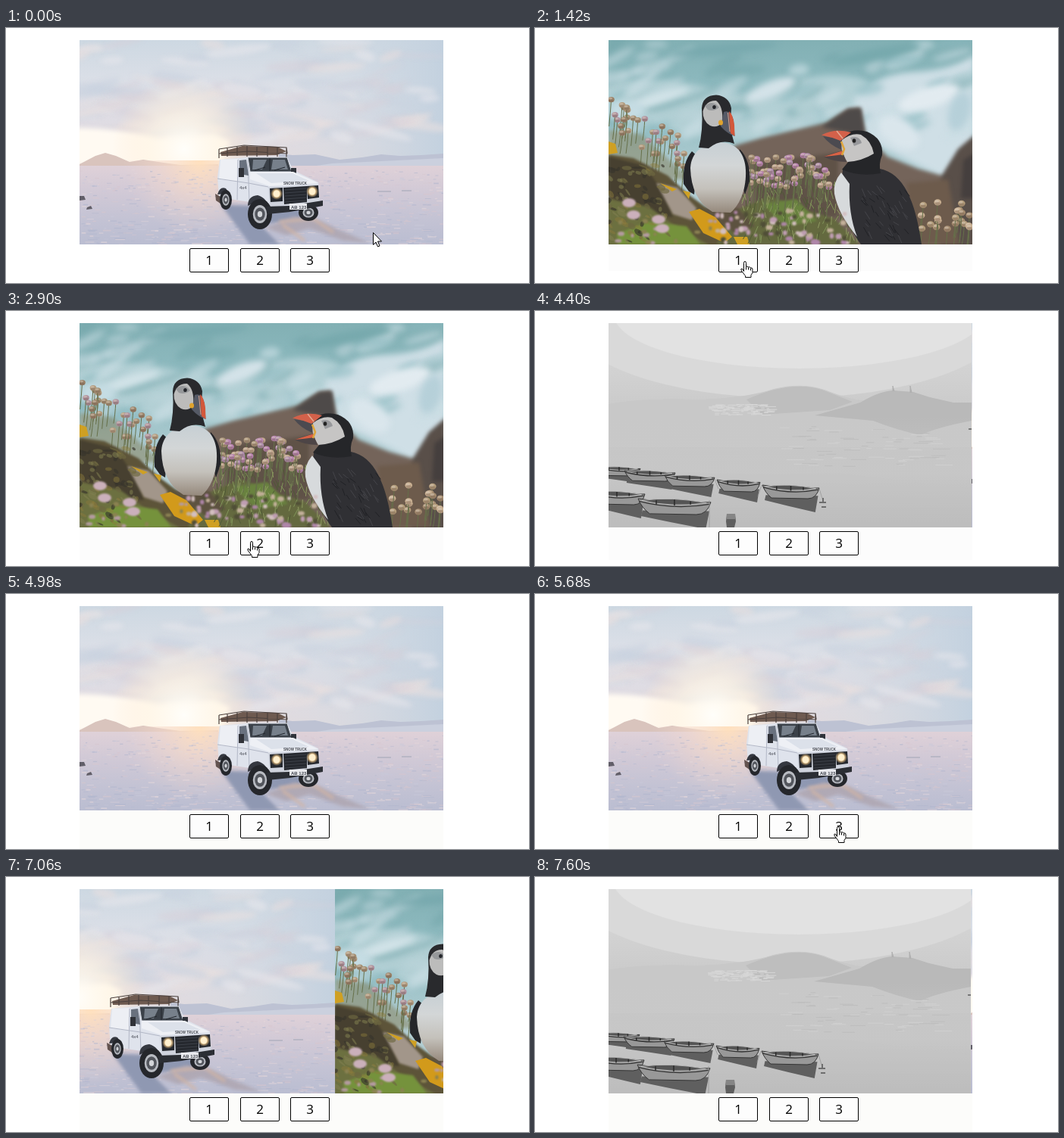
Write an HTML page with a canvas that moves like this. It is 690 by 337 pixels and loops after 8000 ms.

```html
<!DOCTYPE html>
<html lang="en">
<head>
<meta charset="utf-8">
<title>Image carousel</title>
<style>
  html, body { margin: 0; width: 100%; height: 100%; overflow: hidden; background: #fff; }
  canvas { display: block; width: 690px; height: 337px; }
</style>
</head>
<body>
<canvas id="stage" width="690" height="337"></canvas>
<script>
const LOOP = 8000, LEFT = 97, TOP = 16, W = 480, H = 270;
const SPEED = 1.15 / W; // slides per ms
const BUTTONS = [242, 309, 375];
const stage = document.getElementById('stage').getContext('2d');
let g; // context of the scene being painted

// ---------- drawing helpers ----------
function shape(d, fill, stroke, width = 1) {
  const path = new Path2D(d);
  if (fill) { g.fillStyle = fill; g.fill(path); }
  if (stroke) { g.strokeStyle = stroke; g.lineWidth = width; g.stroke(path); }
}
function oval(x, y, rx, ry, fill, angle = 0) {
  g.fillStyle = fill;
  g.beginPath();
  g.ellipse(x, y, rx, ry, angle, 0, 7);
  g.fill();
}
function rect(x, y, w, h, fill) {
  g.fillStyle = fill;
  g.fillRect(x, y, w, h);
}
function stops(gradient, ...colors) {
  colors.forEach((c, i) => gradient.addColorStop(i / (colors.length - 1), c));
  return gradient;
}
const vertical = (y0, y1, ...colors) => stops(g.createLinearGradient(0, y0, 0, y1), ...colors);
const glow = (x, y, r, ...colors) => stops(g.createRadialGradient(x, y, 0, x, y, r), ...colors);
function blurred(radius, paint) {
  g.filter = `blur(${radius}px)`;
  paint();
  g.filter = 'none';
}
function random(seed) {
  return (a = 0, b = 1) => a + (b - a) * ((seed = seed * 16807 % 2147483647) / 2147483647);
}
function makeScene(paint) {
  const canvas = document.createElement('canvas');
  canvas.width = W;
  canvas.height = H;
  g = canvas.getContext('2d');
  g.translate(-LEFT, -TOP);
  paint();
  return canvas;
}

// ---------- puffins ----------
function flowers(r, count, x0, x1, yAt, colors, size) {
  for (let i = 0; i < count; i++) {
    const x = r(x0, x1), y = yAt(x) + r(-20, 24), color = colors[i % colors.length];
    shape(`M${x},${y} q-1,18 -3,${r(25, 42)}`, null, '#66704a', 1);
    oval(x, y, size, size * .85, color);
    oval(x, y + size * .35, size * .75, size * .45, '#6b554855');
    oval(x - 1, y - 1.5, size * .6, size * .35, '#ddd0c077');
  }
}
function puffins() {
  const r = random(41);
  rect(LEFT, TOP, W, H, vertical(16, 200, '#82b0b4', '#93bec4', '#b2cdd2'));
  blurred(4, () => {
    shape('M85,75 Q160,60 230,80 T340,70 Q400,55 440,70 L430,110 300,150 190,140 85,100Z', '#b3d0d5');
    shape('M420,95 Q450,60 500,58 T580,35 V150 L540,198 440,150Z', '#cfdfe6');
    for (let i = 0; i < 70; i++) {
      oval(r(90, 580), r(18, 140), r(12, 34), r(4, 9), ['#bdd6dbaa', '#cbdfe5aa', '#6fa3a877', '#8ebbc199'][i % 4], r(-.7, 0));
    }
    oval(165, 92, 40, 7, '#d2e3e8', -.3);
    oval(120, 110, 24, 14, '#c5dce3');
    oval(310, 82, 36, 11, '#d3e2e8', -.4);
    oval(520, 92, 42, 14, '#e2ebf0', -.3);
    oval(480, 138, 30, 18, '#dae6ec', .6);
    oval(560, 110, 14, 26, '#b6d0d9', .3);
    oval(450, 35, 60, 8, '#77a9ad', -.2);
    oval(250, 28, 70, 7, '#78a9ae', -.1);
  });
  blurred(2.5, () => {
    shape('M262,156 L300,145 385,125 412,107 429,105 436,140 465,170 505,186 540,196 580,205 V290 H250Z', '#74645a');
    shape('M378,131 L414,107 430,106 435,142 Z', '#4e4a49');
    shape('M536,196 L558,160 580,141 V290 H535Z', '#594f49');
    shape('M565,175 L580,165 V225 H562Z', '#453f3e');
    shape('M290,178 L400,165 400,250 290,250Z', '#5f5247');
    shape('M490,205 L545,200 560,286 500,286Z', '#6d5b4c');
    shape('M97,135 L140,140 205,200 97,200Z', '#85825f88');
  });
  flowers(r, 34, 97, 198, x => 108 + (x - 97) * .58, ['#a48f72', '#9a8268', '#b0929f', '#b39d80'], 4.3);

  blurred(1.5, () => {
    shape('M97,167 L130,172 175,195 205,222 260,262 300,290 H97Z', '#5d5439');
    shape('M97,170 L145,182 172,222 182,250 130,245 97,220Z', '#474030');
    shape('M97,226 L150,236 180,258 235,290 H97Z', '#6c7040');
    shape('M160,205 L188,211 213,238 207,254 182,246Z', '#a2968a');
    shape('M255,245 L310,222 350,238 395,252 428,286 H240Z', '#64693f');
    shape('M300,232 L345,226 372,255 330,262Z', '#69823f');
    shape('M222,238 L268,238 290,262 262,270Z', '#5d5240');
    shape('M108,272 L150,256 200,262 218,286 H110Z', '#75923c');
  });
  for (let i = 0; i < 90; i++) {
    oval(r(97, 175), r(180, 282), r(2, 7), r(1, 4), ['#6d6840aa', '#37352caa', '#81805088', '#8c7a3c77'][i % 4], r(0, 1));
  }
  shape('M203,243 L217,239 238,250 260,276 250,284 222,271Z', '#d29a1b');
  shape('M97,150 L106,153 109,165 97,167Z M165,205 l22,8 -6,3Z M195,215 l10,2 -2,9Z M262,276 l18,0 3,10 h-16Z', '#cfa023');
  for (let i = 0; i < 170; i++) {
    const x = r(270, 425), y = r(215, 286);
    shape(`M${x},${y} l${r(-6, 6)},${r(-13, -7)}`, null, ['#82965a', '#4f5b35', '#8f9b62'][i % 3]);
  }
  flowers(r, 75, 283, 388, x => 186 + Math.abs(x - 335) * .1, ['#b08fae', '#ac977a', '#bfa58c', '#b984b2'], 4.3);
  flowers(r, 20, 500, 574, x => 250, ['#b39c7a', '#c9b092', '#a68d70'], 4.8);

  // left bird
  shape('M207,163 Q194,178 196,206 L203,216 210,220 215,170Z M270,160 Q285,175 283,203 L277,220 266,180Z', '#25262a');
  shape('M205,185 C206,164 222,152 243,151 C266,151 277,166 278,188 C279,210 272,232 258,244 L234,243 Q206,226 205,185Z',
    vertical(150, 244, '#c6cfd4', '#d3d6d7', '#c4c1bb', '#95897c'));
  shape('M220,106 Q221,89 239,88.5 Q256,90 259,106 Q256,132 263,153 Q245,146 229,159 L216,158 Q222,136 220,106Z', '#292a2d');
  shape('M221.5,110 Q226,95 239,96 Q249,104 247,125 Q240,133 231,129 Q221,123 221.5,110Z', '#bcbcbb');
  shape('M224,103 Q235,94 243,105 Q236,111 228,108Z', '#96989a');
  oval(236.5, 104.5, 2.3, 2.6, '#24262b');
  shape('M249,111 Q258,107 262,122 L263.5,143 Q254,140 245,130Z', '#555a66');
  shape('M256,110 Q261,114 263,128 L263.5,143 L258,139Z', '#d3583b');
  oval(245, 125, 3, 3.5, '#dfa32d');
  shape('M254.5,112 L257,137', null, '#d9a28c');

  // right bird
  shape('M406,187 Q420,175 455,186 C486,192 502,228 510,286 H430 Q411,261 403,221Z', '#303034');
  shape('M404,191 Q393,204 395,219 Q400,246 425,276 Q413,245 415,206Z', '#d7dadc');
  shape('M406,141 Q421,132 438,137 Q460,146 458,168 Q453,179 456,192 Q427,197 405,187 L414,176Z', '#252629');
  shape('M404,149 Q417,138 430,141 Q444,149 447,166 Q431,176 412,177 Q403,164 404,149Z', '#c6c5c4');
  shape('M416,145 Q428,141 431,152 L421,156Z', '#97989b');
  oval(421, 149, 2.3, 2.8, '#222');
  shape('M380,143 L405,147 404,161 Q388,154 380,143Z', '#4b4a50');
  shape('M378,141.5 Q395,132 417,138 L403,149 Q391,144 378,141.5Z', '#d3614a');
  shape('M381,170 Q394,165 405,162 L411,177 Q394,177 381,170Z', '#4d4546');
  shape('M381,170 L405,162.5 407,167 Q394,169 381,170Z', '#d96245');
  shape('M398,136 L406,146', null, '#e3aa92', 1.5);
  shape('M404,150 l4,10 -3,8', null, '#dfa63c', 2.5);
  for (let i = 0; i < 50; i++) shape(`M${r(430, 488)},${r(208, 275)} l${r(3, 8)},${r(4, 12)}`, null, i % 2 ? '#45454a' : '#202125');

  blurred(1, () => {
    for (let i = 0; i < 65; i++) {
      oval(r(240, 415), r(240, 284), r(2, 5), r(2, 4), ['#bf9db2', '#c3b09a', '#ae85a8', '#504e37', '#d3bfc0'][i % 5]);
    }
    for (let i = 0; i < 16; i++) oval(r(105, 240), r(245, 284), r(2, 5), r(2, 3), i % 2 ? '#b49aa0' : '#8b8252');
    [[124, 231], [130, 247], [163, 253], [168, 265]].forEach(([x, y]) => oval(x, y, 9, 6, '#cbb0bb'));
  });
}

// ---------- boats ----------
function boat(x, y, w, h, reflection = 14) {
  g.save();
  g.translate(x, y);
  shape(`M${w * .06},${h * .75} L${w * .98},${h * .8} L${w * .93},${h + reflection} Q${w * .5},${h + reflection * .6} ${w * .04},${h + 2}Z`, '#5f5f5f');
  shape(`M0,1 Q${w * .45},${h * .35} ${w},${h * .26} Q${w * .95},${h} ${w * .8},${h} L${w * .16},${h * .95} Q${w * .05},${h * .6} 0,1Z`, '#989898', '#353535', 1);
  shape(`M${w * .05},${h * .16} Q${w * .45},${h * -.1} ${w * .94},${h * .3} Q${w * .48},${h * .6} ${w * .05},${h * .16}Z`, '#555', '#c5c5c5', .8);
  shape(`M1,${h * .2} Q${w * .5},${h * .75} ${w * .98},${h * .38}`, null, '#333', 1.3);
  shape(`M${w * .25},${h * .15} v${h * .25} M${w * .5},${h * .1} v${h * .35} M${w * .72},${h * .2} v${h * .2}`, null, '#292929', 1.5);
  g.restore();
}
function boats() {
  const r = random(17);
  rect(LEFT, TOP, W, H, vertical(16, 286, '#dadada', '#d1d1d1', '#c7c7c7', '#c2c2c2', '#b7b7b7'));
  oval(335, 10, 290, 105, '#d9d9d9');
  oval(350, 4, 245, 72, '#e2e2e2');
  shape('M97,123 Q145,114 215,117 Q280,115 316,103 Q352,94 383,104 Q420,119 440,118 L577,126 V180 H97Z', '#c8c8c8');
  shape('M280,117 Q345,88 390,108 L420,120 390,131 300,137Z', '#bebebe');
  shape('M370,138 L430,121 Q455,106 473,105 L500,107 522,114 553,121 577,121 V145 Q530,154 510,164 Q480,158 447,145Z', '#b9b9b9');
  shape('M473,106 v-7 l2,7 M496,108 v-9 l2,9', '#b0b0b0', '#b0b0b0');
  rect(LEFT, 140, W, 146, vertical(140, 286, '#c9c9c900', '#c9c9c9aa', '#bababa99'));
  for (let i = 0; i < 90; i++) rect(r(230, 308), r(123, 137), r(3, 14), 1, '#d7d7d7');
  for (let i = 0; i < 75; i++) rect(r(320, 530), r(152, 205), r(5, 24), 1, i % 2 ? '#d0d0d0' : '#bdbdbd');
  shape('M97,205 Q220,219 400,214 L577,235 V286 H97Z', '#c4c4c455');
  rect(573, 155, 4, 2, '#777');
  boat(84, 205, 56, 13, 9);
  boat(119, 210, 67, 15, 11);
  boat(172, 216, 66, 16, 14);
  boat(241, 222, 57, 17, 14);
  boat(301, 229, 75, 19, 18);
  boat(72, 237, 74, 19, 18);
  boat(137, 247, 96, 22, 19);
  shape('M238,222 L243,235 M300,230 l-5,15 M231,250 V286 M376,235 l5,16', null, '#999', .8);
  shape('M254,268 h11 l1,10 -2,8 h-10 l-1,-8Z', '#5f5f5f');
  rect(254, 268, 11, 7, '#858585');
  shape('M376,252 h9 v2 h-9Z M380,247 h2 v5 h-2Z M379,258 h6 v2 h-6Z', '#6d6d6d');
}

// ---------- car on the snow ----------
function wheel(x, y, rx, ry) {
  oval(x, y, rx, ry, '#25272c');
  oval(x, y, rx * .58, ry * .6, '#b8bbc2');
  oval(x, y, rx * .42, ry * .44, '#53565d');
  oval(x, y, rx * .2, ry * .2, '#d3d5d9');
}
function car() {
  const r = random(77);
  rect(LEFT, TOP, W, 170, vertical(16, 180, '#cdd8e2', '#dbdfe7', '#dfdce3', '#e2dadd'));
  rect(LEFT, TOP, W, 170, stops(g.createLinearGradient(97, 0, 577, 0), '#d9dfe500', '#d9dfe500', '#c3d1df'));
  blurred(3, () => {
    for (let i = 0; i < 90; i++) {
      oval(r(90, 580), r(18, 145), r(12, 48), r(2, 8), ['#e8dfdf99', '#c9d3df88', '#e6e6ec99', '#d6d1d988'][i % 4], r(-.4, .3));
    }
    shape('M90,132 Q150,132 200,146 L275,141 295,150 285,180 90,182Z', '#fffaf2');
  });
  rect(LEFT, TOP, W, 170, glow(235, 160, 95, '#fffefa', '#fff5e4aa', '#ffe8d000'));
  shape('M97,180 L118,169 131,165 145,169 163,177 181,174 208,178 230,181 280,180 V188 H97Z', '#d9c4bd');
  shape('M360,166 L378,168 408,167 440,174 470,171 495,167 520,169 548,168 577,166 V195 H360Z', '#bdc2d3');
  shape('M390,185 L430,179 475,177 577,172 V196 H390Z', '#cbd0de');
  rect(LEFT, 182, W, 104, vertical(182, 286, '#dfd1d8', '#d1c9d6', '#c4c3d4', '#babdd1'));
  rect(LEFT, 175, W, 111, glow(255, 175, 100, '#ffe0bd', '#f6dacb88', '#f0d6cf00'));
  for (let i = 0; i < 850; i++) {
    const y = r(187, 286);
    rect(r(97, 577), y, r(2, (y - 170) / 9 + 3), r(.6, 1.8), ['#e5d7da99', '#aeb5cc88', '#d7c7cf99', '#c9c9d988'][i % 4]);
  }
  shape('M97,222 h6 l2,5 -8,1Z M107,237 l5,-2 2,4 -8,1Z', '#615e68');
  shape('M490,216 h18 M522,215 h13', null, '#a0a5b5');
  blurred(2, () => {
    shape('M283,233 L322,286 361,286 335,260 410,251 385,238Z', '#8f98b2');
    shape('M342,264 L380,249 415,255 440,267 480,284 445,281 400,265 370,274Z', '#b0a9b5');
    shape('M360,256 L405,252 432,270 M365,260 L394,281', null, '#d3b5a4', 3);
  });

  // roof rack
  shape('M283,164 L312,156 358,157 370,163 357,168 284,169Z', '#6e5a50');
  shape('M281,160 L314,155 370,158 371,166 M281,160 V172 M281,166 L320,163 371,166 M292,159 V170 M305,157 V169 M318,156 V170 M331,157 V170 M345,157 V170 M358,158 V170 M370,158 V171',
    null, '#4a403d', 1.2);
  // body
  shape('M282,174 L318,171 371,171 379,188 412,204 414,235 347,239 322,230 281,224 279,197Z', '#dfe3ec');
  shape('M283,174 L306,173 305,203 281,200Z', '#edeff4');
  shape('M279,199 L320,205 346,210 M306,174 L305,227 M319,174 L321,230', null, '#b2b7c6');
  shape('M308,175 L317,174 320,195 308,193Z', '#69717e');
  rect(307, 185, 7, 12, '#303238');
  shape('M319,171 L371,171 377,190 322,190Z', '#3b4149', '#d9dde5');
  shape('M326,174 L344,174 338,187 325,187Z M352,174 L368,174 372,187 350,187Z', '#77808b');
  shape('M348,172 V189 M328,188 l14,-4 M354,188 l14,-4', null, '#22262c');
  rect(376, 185, 7, 10, '#30343b');
  shape('M322,190 L379,190 412,205 348,209 322,200Z', '#eef0f5');
  shape('M330,192 L378,192 400,202 350,205Z', '#dce1ea');
  shape('M346,210 L412,207 414,230 348,238Z', '#cfd3dd');
  shape('M348,212 L365,211 365,229 349,230Z M397,209 L412,208 413,224 398,226Z M366,211 L397,209 397,230 367,233Z', '#25282e');
  for (let y = 214; y < 231; y += 4) shape(`M368,${y} L396,${y - 2}`, null, '#3d4149');
  [[357, 219], [404, 216]].forEach(([x, y]) => {
    oval(x, y, 8, 8, glow(x, y, 8, '#fff9e5', '#ffdda4', '#e7b66f00'));
    oval(x, y, 4.2, 4.5, '#fff0cf');
  });
  shape('M319,235 Q319,222 332,221 Q344,224 350,242 L344,246 Q338,229 330,230Z M279,220 Q282,209 290,212 L297,222 292,219Z', '#353840');
  shape('M276,219 L285,224 283,232 277,228Z', '#63534f');
  wheel(290, 227, 8, 13);
  wheel(399, 244, 13, 11);
  wheel(335, 246, 16, 20);
  shape('M343,236 L374,235 418,228 418,235 375,243 345,246Z', '#2b2e34');
  rect(374, 232, 23, 8, '#e9eaee');
  g.fillStyle = '#41454e';
  g.font = 'bold 6px "Liberation Sans", sans-serif';
  g.fillText('AB 123', 376, 238.5);
  g.font = 'bold 4.5px "Liberation Sans", sans-serif';
  g.fillText('SNOW TRUCK', 366, 206.5);
  g.font = '6px "Liberation Sans", sans-serif';
  g.fillText('4x4', 308, 213);
}

const scenes = [puffins, boats, car].map(makeScene);

// ---------- timeline ----------
// The picture refreshes only inside these spans: start, end, number of steps.
const REFRESHES = [[150, 570, 4], [850, 1880, 8], [2160, 3170, 9], [3290, 3710, 4],
  [4400, 5280, 7], [5530, 5800, 3], [6080, 6080, 1], [6790, 7600, 7]];
// start, slide to reach, jump at once
const MOVES = [[140, 3], [1460, 4], [2150, 3], [3280, 4], [4399, 5], [5800, 6, true], [6767, 4]];
// each visit of the pointer: time, x, y
const VISITS = [
  [[0, 484, 270], [150, 484, 270], [570, 300, 301], [850, 300, 301], [1140, 271, 308], [2160, 271, 308]],
  [[2660, 318, 313], [2780, 318, 304], [3710, 318, 304]],
  [[5000, 394, 337], [5280, 394, 312], [5530, 394, 307], [6080, 394, 307]]
];

function refreshTime(t) {
  let held = 0;
  for (const [start, end, count] of REFRESHES) {
    if (t < start) break;
    const step = (end - start) / (count - 1) || 1;
    held = Math.min(end, start + Math.floor((t - start) / step + 1e-6) * step);
  }
  return held;
}
function slidePosition(t) {
  let position = 2;
  for (const [start, target, jump] of MOVES) {
    if (t < start) break;
    const gap = target - position;
    position += jump ? gap : Math.sign(gap) * Math.min(Math.abs(gap), (t - start) * SPEED);
  }
  return position;
}
function pointerAt(t) {
  const visit = VISITS.find(v => t >= v[0][0] && t < v[v.length - 1][0]);
  if (!visit) return null;
  const i = visit.findIndex(key => key[0] > t);
  const [t0, x0, y0] = visit[i - 1], [t1, x1, y1] = visit[i];
  const k = (t - t0) / (t1 - t0);
  return [Math.round(x0 + (x1 - x0) * k), Math.round(y0 + (y1 - y0) * k)];
}

// ---------- stage ----------
function drawPointer(x, y) {
  const overButton = y >= 291 && y < 323 && BUTTONS.some(left => x + 5 >= left && x + 5 < left + 52);
  g.save();
  g.translate(x + .5, y + .5);
  g.lineJoin = 'round';
  if (overButton) {
    shape('M4,13 V2 Q4,0 5.5,0 Q7,0 7,2 V7 Q8,6 10,7.5 Q12,6.5 13,8.5 Q15.5,8 15.5,10.5 V15 L13.5,18 V21 H6 V19 L1,12.5 Q-.5,10 1,9.5 Q2.5,9.5 4,13Z', '#fff', '#000');
    shape('M7,7 V11 M10,8 V11 M13,9 V12', null, '#000');
  } else {
    shape('M0,0 V16 L3.5,12.5 6,18.5 8.5,17.5 6,11.5 H11Z', '#fff', '#000');
  }
  g.restore();
}
function draw(t) {
  g = stage;
  rect(0, 0, 690, 337, '#fff');
  const bandEnd = t >= 4500 ? 337 : t >= 2160 ? 329 : 321;
  if (t >= 150) rect(LEFT, 286, W, bandEnd - 286, t >= 4500 ? '#fcfcfa' : '#fcfcfc');

  g.save();
  g.beginPath();
  g.rect(LEFT, TOP, W, H);
  g.clip();
  const position = slidePosition(t), first = Math.floor(position);
  const shift = Math.round((position - first) * W);
  g.drawImage(scenes[first % 3], LEFT - shift, TOP);
  if (shift) g.drawImage(scenes[(first + 1) % 3], LEFT + W - shift, TOP);
  g.restore();

  g.font = '17px "Open Sans", "Noto Sans", sans-serif';
  g.textAlign = 'center';
  BUTTONS.forEach((x, i) => {
    g.beginPath();
    g.roundRect(x + .5, 291.5, 51, 31, 1.5);
    g.fillStyle = '#fdfdfd';
    g.fill();
    g.strokeStyle = '#000';
    g.lineWidth = 1;
    g.stroke();
    g.fillStyle = '#000';
    g.fillText(i + 1, x + 26, 313);
  });

  const pointer = pointerAt(t);
  if (pointer) drawPointer(...pointer);
}

const begin = performance.now();
function tick() {
  draw(refreshTime((performance.now() - begin) % LOOP));
  requestAnimationFrame(tick);
}
tick();
</script>
</body>
</html>
```
